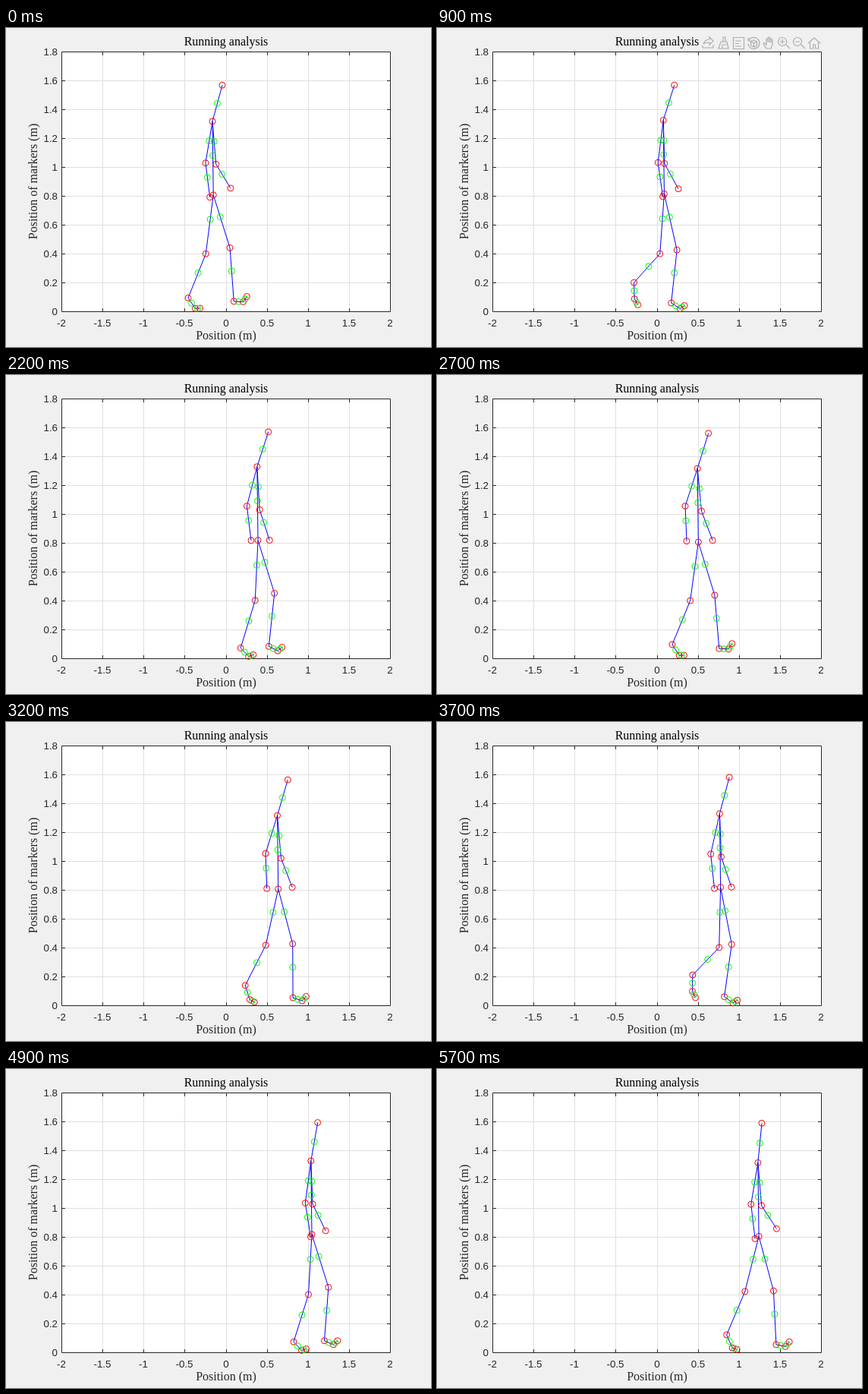
These frames come from a looping animation (560 px wide and 420 px high, 5.8 s). An HTML page:

```html
<!DOCTYPE html>
<html lang="en">
<head>
<meta charset="utf-8">
<title>Running analysis</title>
<style>
  html, body { margin: 0; width: 100%; height: 100%; overflow: hidden; background: #f0f0f0; }
  svg { display: block; fill: none; }
  text { fill: #262626; font: 13.33px "Liberation Sans", Arial, sans-serif; text-anchor: middle; }
  .tex { font: 16px "Liberation Serif", "Times New Roman", serif; }
  #tools { stroke: #adadad; stroke-width: 1.2; }
</style>
</head>
<body>
<svg width="560" height="420" viewBox="0 0 560 420">
  <rect x="73.5" y="31.5" width="433" height="342" fill="#fff"/>
  <path id="grid" stroke="#dfdfdf"/>
  <path id="axes" stroke="#262626"/>
  <g id="labels"></g>
  <text class="tex" x="290" y="23" style="fill:#000">Running analysis</text>
  <text class="tex" x="290" y="410">Position (m)</text>
  <text class="tex" transform="translate(41 202) rotate(-90)">Position of markers (m)</text>
  <path id="bones" stroke="#00f"/>
  <path id="joints" stroke="#f00"/>
  <path id="centres" stroke="#0f0"/>
  <g id="tools">
    <path d="M350 26h14v-4M350 26v-3M351 21q2-6 8-6v-3l5 5-5 5v-3q-5 0-8 2"/>
    <path d="M377 12h3v6h-3zM374 18h8l2 9h-13zM375 22h7M376 27v-4"/>
    <path d="M390.5 12.5h14v15h-14zM393 17h8M393 20.5h5M393 24h8"/>
    <path d="M411 16a7.5 7.5 0 1 1-1 5M410 13v4h4M413.5 18l4-2 4 2v5l-4 2-4-2zM413.5 18l4 2 4-2M417.5 20v5"/>
    <path d="M434 27l-4-6q0-2 2-1l2 2v-7q1-2 2 0v4-6q1-2 2 0v6-5q1-2 2 0v6-4q2-2 2 0v6l-2 5z"/>
    <path d="M460 22l5 5M452 18h6M455 15v6"/><circle cx="455" cy="18" r="5.5"/>
    <path d="M480 22l5 5M472 18h6"/><circle cx="475" cy="18" r="5.5"/>
    <path d="M489 20l8-7 8 7M491.5 19v8h4v-5h3v5h4v-8"/>
  </g>
</svg>
<script>
// Lengths in metres, times in seconds, angles in radians from straight down.
const LOOP = 5.8, FPS = 10, CYCLE = 5.3, STRIDE = 1.29;
const HEAD = .278, TRUNK = .51, UPPER_ARM = .3, FOREARM = .243;
const THIGH = .418, SHANK = .374, FOOT = .113, TOE = .058, TOE_BEND = .73;
const { sin, cos, PI } = Math;
const $ = id => document.getElementById(id);
const toStage = ([x, y]) => [290 + 108.25 * x, 373.5 - 190 * y];

// One gait cycle of a leg: time, ankle x, ankle y, foot angle.
const GAIT = [
  [0, -.462, .095, .87],      // heel rising
  [.5, -.425, .134, .57],
  [1.05, -.212, .213, -.03],  // toe off
  [1.55, .069, .139, .61],
  [2.225, .536, .084, 1.31],
  [2.675, .748, .071, 1.54],  // heel strike
  [3.1, .808, .055, 1.43],
  [3.6, .818, .061, 1.2],
  [4.85, .822, .074, 1.03]    // end of stance
];

// Gait key i, continued beyond the first cycle.
function gaitKey(i) {
  const n = GAIT.length, lap = Math.floor(i / n);
  const [time, x, y, angle] = GAIT[i - lap * n];
  return [time + lap * CYCLE, x + lap * STRIDE, y, angle];
}

// Smooth curve through the gait keys.
function gait(t) {
  let i = 0;
  while (gaitKey(i + 1)[0] <= t) i++;
  const [before, a, b, after] = [-1, 0, 1, 2].map(k => gaitKey(i + k));
  const span = b[0] - a[0], u = (t - a[0]) / span, v = 1 - u;
  return [1, 2, 3].map(k => {
    const slopeA = (b[k] - before[k]) / (b[0] - before[0]) * span;
    const slopeB = (after[k] - a[k]) / (after[0] - a[0]) * span;
    return v * v * (1 + 2 * u) * a[k] + u * u * (3 - 2 * u) * b[k]
      + u * v * (v * slopeA - u * slopeB);
  });
}

const limb = ([x, y], length, angle) => [x + length * sin(angle), y - length * cos(angle)];

// The second leg runs half a cycle ahead and half a stride behind.
function leg(hip, t, half) {
  const [x, y, angle] = gait(t + half * CYCLE / 2);
  const ankle = [x - half * STRIDE / 2, y];
  const dx = ankle[0] - hip[0], dy = hip[1] - ankle[1], reach = Math.hypot(dx, dy);
  const bend = Math.acos(Math.min(1, (THIGH ** 2 + reach ** 2 - SHANK ** 2) / (2 * THIGH * reach)));
  const knee = limb(hip, THIGH, Math.atan2(dx, dy) + bend);
  const ball = limb(ankle, FOOT, angle);
  return [knee, ankle, ball, limb(ball, TOE, angle + TOE_BEND)];
}

function arm(neck, phase, shoulder, shoulderSwing, bend, bendSwing) {
  const elbow = limb(neck, UPPER_ARM, shoulder + shoulderSwing * cos(phase - .25));
  return [elbow, limb(elbow, FOREARM, bend + bendSwing * cos(phase - .4))];
}

const ring = ([x, y]) => `M${x - 4} ${y}a4 4 0 1 0 8 0a4 4 0 1 0-8 0`;
const mix = (p, q, f) => p.map((c, i) => c + (q[i] - c) * f);

function draw(t) {
  const phase = 2 * PI * t / CYCLE, step = 2 * phase;
  const hip = [-.14 + STRIDE / CYCLE * t - .015 * cos(step), .818 - .012 * cos(step - .7)];
  const neck = [hip[0] - .011, hip[1] + TRUNK];
  const head = limb(neck, -HEAD, .023 * (t - 1.8) ** 2 - .52);
  const arms = [
    arm(neck, phase, -.185, .34, .45, .4),
    arm(neck, phase + PI, -.06, .23, .4, .2)
  ];
  const legs = [leg(hip, t, 0), leg(hip, t, 1)];

  // Each segment: its ends and where its centre of mass lies.
  const segments = [[head, neck, .5], [neck, hip, .465]];
  for (const [elbow, hand] of arms)
    segments.push([neck, elbow, .47], [elbow, hand, .42]);
  for (const [knee, ankle, ball, toe] of legs)
    segments.push([hip, knee, .415], [knee, ankle, .433], [ankle, ball, .5], [ball, toe, .5]);

  const set = (id, parts) => $(id).setAttribute("d", parts.join(""));
  set("bones", segments.map(([p, q]) => `M${toStage(p)}L${toStage(q)}`));
  set("joints", [head, neck, hip, ...arms.flat(), ...legs.flat()].map(p => ring(toStage(p))));
  set("centres", segments.map(s => ring(toStage(mix(...s)))));
  const toolbar = t >= .4 && t < 1.1 || t >= 4.4 && t < 4.7;
  $("tools").style.display = toolbar ? "" : "none";
}

function buildAxes() {
  let grid = "", axes = "M73.5 31.5h433v342h-433z", labels = "";
  for (let i = 0; i <= 8; i++) {
    const x = Math.round(73 + i * 54.125) + .5;
    if (i % 8) grid += `M${x} 32V373`;
    axes += `M${x} 373v-4M${x} 32v4`;
    labels += `<text x="${x - .5}" y="393">${i / 2 - 2}</text>`;
  }
  for (let i = 0; i <= 9; i++) {
    const y = 373.5 - i * 38;
    if (i % 9) grid += `M74 ${y}H506`;
    axes += `M74 ${y}h4M506 ${y}h-4`;
    labels += `<text x="68" y="${y + 4.5}" style="text-anchor:end">${+(i / 5).toFixed(1)}</text>`;
  }
  $("grid").setAttribute("d", grid);
  $("axes").setAttribute("d", axes);
  $("labels").innerHTML = labels;
}

const start = performance.now();
function tick() {
  const t = (performance.now() - start) / 1000 % LOOP;
  draw(Math.floor(t * FPS) / FPS);
  requestAnimationFrame(tick);
}
buildAxes();
tick();
</script>
</body>
</html>
```
